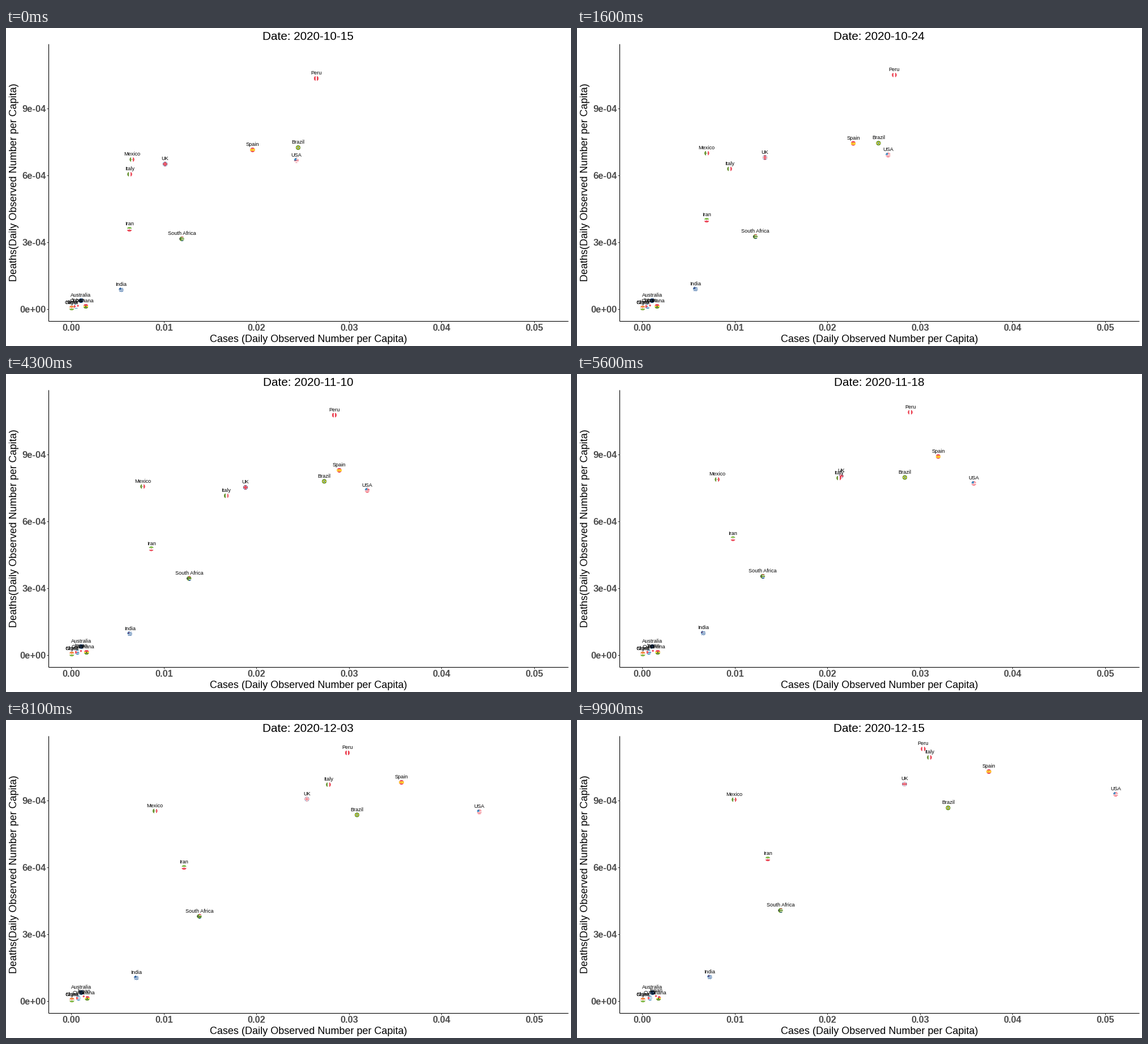
Animation of 998x561 px, one loop 10 s. Source, as a matplotlib script:

```python
import matplotlib.pyplot as plt
import numpy as np
from matplotlib.animation import FuncAnimation
from matplotlib.patches import Circle, Polygon, Rectangle
from matplotlib.path import Path
from matplotlib.transforms import Affine2D

W, H, DPI = 998, 561, 100
FRAMES = 100
START, DAYS = np.datetime64("2020-10-15"), 61
KEYS = np.array([0, 16, 31, 56, 69, 81, 99])
R = 4.3

RED, GREEN, LIME = "#ed4c5c", "#699635", "#83bf4f"
BLUE, NAVY, YELLOW = "#428bc1", "#2a5f9e", "#ffe62e"
GOLD, ORANGE, WHITE, DARK = "#ffce31", "#f2853f", "#ffffff", "#3e4347"

plt.rcParams["font.family"] = "Liberation Sans"
fig = plt.figure(figsize=(W / DPI, H / DPI), dpi=DPI, facecolor="white")
ax = fig.add_axes([0, 0, 1, 1])
ax.set_xlim(0, W)
ax.set_ylim(H, 0)
ax.axis("off")


def px(n):
    return n * 72 / DPI


def write(x, y, s, size, ha="center", **kw):
    return ax.text(x, y, s, fontsize=px(size), ha=ha, va="baseline", **kw)


def line(x0, y0, x1, y1, color="black"):
    ax.plot([x0, x1], [y0, y1], color=color, lw=px(1.1), solid_capstyle="butt")


# Flag pieces, in pixels around the flag centre
def box(x0, y0, x1, y1, color):
    return Rectangle((x0, y0), x1 - x0, y1 - y0, fc=color, lw=0)


def disc(r, color, x=0, y=0):
    return Circle((x, y), r, fc=color, lw=0)


def poly(color, *pts):
    return Polygon(pts, closed=True, fc=color, lw=0)


def bars(*colors):
    e = np.linspace(-R, R, len(colors) + 1)
    return [box(a, -R, b, R, c) for a, b, c in zip(e, e[1:], colors)]


def bands(*colors):
    e = np.linspace(-R, R, len(colors) + 1)
    return [box(-R, a, R, b, c) for a, b, c in zip(e, e[1:], colors)]


def stroke(slope, w, color):
    return poly(color, (-R, -R * slope - w), (R, R * slope - w),
                (R, R * slope + w), (-R, -R * slope + w))


def waves():
    x = np.linspace(-R, R, 13)
    out = [disc(R, WHITE)]
    for y in (-2.6, 0, 2.6):
        top = y - 0.6 + 0.5 * np.sin(x * 1.8)
        edge = list(zip(x, top)) + list(zip(x[::-1], top[::-1] + 1.2))
        out.append(poly(NAVY, *edge))
    return out + [box(-R, -R, -0.6, -0.6, NAVY), box(-2.6, -2.4, -0.8, -1.6, RED)]


# Listed in drawing order
FLAGS = {
    "Australia": [disc(R, NAVY), disc(0.6, WHITE, 2, -1), disc(0.6, WHITE, -1.5, 2)],
    "Brazil": [disc(R, GREEN),
               poly(YELLOW, (-3.7, 0), (0, -2.7), (3.7, 0), (0, 2.7)),
               disc(1.4, BLUE)],
    "China": [disc(R, RED), disc(1, YELLOW, -1.5, -1)],
    "Cuba": bands(BLUE, WHITE, BLUE, WHITE, BLUE)
            + [poly(RED, (-R, -3.6), (0, 0), (-R, 3.6))],
    "Spain": [disc(R, RED), box(-R, -2, R, 2, GOLD), disc(0.9, ORANGE, -1)],
    "UK": [disc(R, NAVY), stroke(1, 0.9, WHITE), stroke(-1, 0.9, WHITE),
           stroke(1, 0.35, RED), stroke(-1, 0.35, RED),
           box(-1.3, -R, 1.3, R, WHITE), box(-R, -1.3, R, 1.3, WHITE),
           box(-0.8, -R, 0.8, R, RED), box(-R, -0.8, R, 0.8, RED)],
    "Ghana": bands(RED, YELLOW, GREEN) + [disc(1.1, DARK)],
    "India": waves(),
    "Iran": bands(LIME, WHITE, RED) + [disc(0.7, RED)],
    "Italy": bars(GREEN, WHITE, RED),
    "Japan": [disc(R, WHITE), disc(1.7, RED)],
    "Mexico": bars(GREEN, WHITE, RED) + [disc(0.8, GREEN)],
    "Niger": bands(ORANGE, WHITE, LIME) + [disc(0.8, ORANGE)],
    "Peru": bars(RED, WHITE, RED),
    "USA": bands(RED, WHITE, RED, WHITE, RED, WHITE, RED)
           + [box(-R, -R, 0, 0, BLUE)],
    "South Africa": [disc(R, GREEN), box(-0.5, -R, R, -2.6, RED),
                     box(-0.5, 2.6, R, R, NAVY),
                     poly(DARK, (-R, -2), (-1.6, 0), (-R, 2)),
                     box(-0.5, -1.8, R, -1.3, WHITE),
                     box(-0.5, 1.3, R, 1.8, WHITE)],
}

# A few waypoints per country: x values, y values
ROUTES = {
    "Australia": ([132.5, 133.5], [481, 481]),
    "Brazil": ([516, 532.5, 548.5, 579, 599.5, 620, 655.5], [211, 195.5, 175, 155]),
    "China": ([116, 116.5], [494, 494]),
    "Cuba": ([124, 129], [491, 490.5]),
    "Spain": ([435.5, 488, 540, 638, 672, 698.5, 727.5],
              [215, 203.5, 190, 145.5, 126, 110, 91]),
    "UK": ([281, 332, 380.5, 466.5, 500.5, 531.5, 578.5],
           [240, 228.5, 215.5, 180, 158.5, 139.5, 113]),
    "Ghana": ([141, 144], [491, 491]),
    "India": ([203.5, 214.5, 227, 234.5], [462, 453.5]),
    "Iran": ([218, 229, 242, 275.5, 296.5, 314.5, 337],
             [355, 339, 323.5, 290.5, 273.5, 260, 245]),
    "Italy": ([218.5, 269.5, 325, 462.5, 522.5, 569.5, 622.5],
              [258, 248.5, 236, 183.5, 147, 114, 66]),
    "Japan": ([127, 139.5], [490, 487]),
    "Mexico": ([222.5, 236, 255, 277.5], [232, 209, 173, 140.5]),
    "Niger": ([116, 116.5], [494, 494]),
    "Peru": ([548, 571.5, 596.5, 611.5], [89, 51]),
    "USA": ([513, 549.5, 589.5, 701, 767.5, 836, 951.5],
            [233.5, 224, 214.5, 193, 178, 162, 131]),
    "South Africa": ([310.5, 315, 319.5, 328, 333.5, 341.5, 359.5],
                     [372, 364, 352, 336]),
}


def smooth(values):
    """Cubic Hermite curve through evenly picked keys, one value per frame."""
    t = np.arange(FRAMES)
    v = np.array(values, float)
    k = KEYS[::6 // (len(v) - 1)]
    if len(v) == 2:
        return np.interp(t, k, v)
    m = np.gradient(v, k, edge_order=2)
    i = np.clip(np.searchsorted(k, t, side="right") - 1, 0, len(k) - 2)
    h = k[i + 1] - k[i]
    s = (t - k[i]) / h
    return ((1 + 2 * s) * (1 - s) ** 2 * v[i] + s * (1 - s) ** 2 * h * m[i]
            + s * s * (3 - 2 * s) * v[i + 1] - s * s * (1 - s) * h * m[i + 1])


class Marker:
    def __init__(self, name):
        self.x, self.y = (smooth(v) for v in ROUTES[name])
        self.move = Affine2D()
        place = self.move + ax.transData
        rim = Path.circle((0, 0), R)
        for part in FLAGS[name]:
            part.set_transform(place)
            ax.add_patch(part)
            part.set_clip_path(rim, place)
            part.set_zorder(3)
        self.label = write(0, 0, name, 9.2, zorder=5)

    def show(self, n):
        x, y = self.x[n], self.y[n]
        self.move.clear().translate(x, y)
        self.label.set_position((x, y - 6.7))


# Axes
line(75.5, 28, 75.5, 517)
line(75, 516.5, 993, 516.5)
for i in range(6):
    x = 115.5 + 163.5 * i
    line(x, 517, x, 520, "#333333")
    write(x, 534, f"{i / 100:.2f}", 16.4, weight="bold", color="#4d4d4d")
for i in range(4):
    y = 495.5 - 117.8 * i
    line(72, y, 75, y, "#333333")
    write(71, y + 6.3, f"{3 * i}e{'-04' if i else '+00'}", 16.5, ha="right",
          weight="bold", color="#4d4d4d")
unit = "(Daily Observed Number per Capita)"
write(534, 553.5, "Cases " + unit, 18)
write(19.5, 272.5, "Deaths" + unit, 18, rotation=90, rotation_mode="anchor")
title = write(533.7, 21.3, "", 20.8)

markers = [Marker(name) for name in FLAGS]


def update(n):
    day = START + n * DAYS // (FRAMES - 1)
    title.set_text(f"Date: {day}")
    for m in markers:
        m.show(n)
    return []


anim = FuncAnimation(fig, update, frames=FRAMES, init_func=lambda: update(0),
                     interval=100, repeat=True, repeat_delay=0, blit=False)
plt.show()
```
